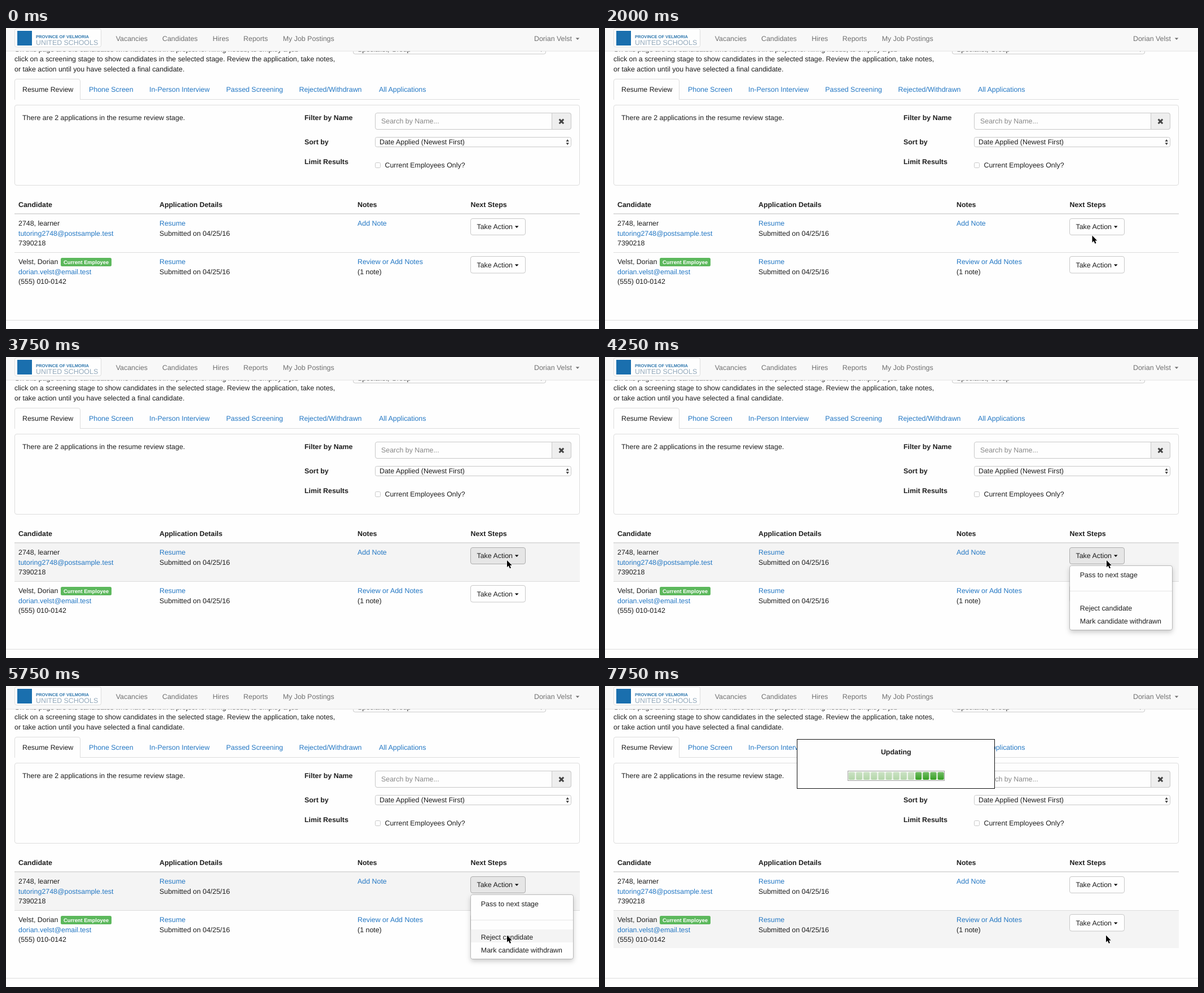
Write an HTML page that moves like this. It is 1051 by 533 pixels and loops after 8000 ms.

```html
<!DOCTYPE html>
<html lang="en">
<head>
<meta charset="utf-8">
<title>Application review</title>
<style>
  html, body { margin: 0; width: 100%; height: 100%; overflow: hidden; background: #fefefe; }
  svg { display: block; width: 1051px; height: 533px; }
  text { font: 12.42px "Liberation Sans", Arial, sans-serif; fill: #1e1e1e; text-rendering: geometricPrecision; }
  .bold text, text.bold { font-weight: bold; }
  .link text, text.link { fill: #2478c4; }
  .nav text { fill: #707070; }
  .box { fill: #fefefe; stroke: #ddd; }
  .field { fill: #fefefe; stroke: #c8c8c8; }
  .line { stroke: #ddd; fill: none; }
  .hover { fill: #f4f4f4; }
  .button.active rect { fill: #e6e6e6; stroke: #adadad; }
  #menu .panel { fill: #fefefe; stroke: rgba(0, 0, 0, .24); filter: drop-shadow(0 4px 4px rgba(0, 0, 0, .2)); }
</style>
</head>
<body>
<svg viewBox="0 0 1051 533">
  <defs>
    <path id="caret" d="M0 0h6.6l-3.3 3.5z"/>
    <path id="arrows" d="M0 4l2.7-4 2.7 4zM0 6.2l2.7 4 2.7-4z" fill="#444"/>
    <linearGradient id="shine" x2="0" y2="1">
      <stop stop-color="#fff" stop-opacity=".3"/>
      <stop offset="1" stop-color="#fff" stop-opacity="0"/>
    </linearGradient>
  </defs>

  <!-- Intro, partly scrolled under the navbar -->
  <text x="15" y="41.6">On this page are the candidates who have sent in a project for hiring needs, to employ a job</text>
  <text x="15" y="59.2">click on a screening stage to show candidates in the selected stage. Review the application, take notes,</text>
  <text x="15" y="76.8">or take action until you have selected a final candidate.</text>
  <rect class="field" x="615.5" y="28.5" width="341" height="17.5" rx="3"/>
  <text x="623" y="41.6">Specialist, Group</text>
  <use href="#arrows" x="946" y="32"/>

  <!-- Tabs -->
  <path class="line" d="M15 126.5H1017"/>
  <path class="box" d="M15.5 127V94a3.5 3.5 0 0 1 3.5-3.5H128a3.5 3.5 0 0 1 3.5 3.5V127"/>
  <text x="29" y="112.6">Resume Review</text>
  <g class="link">
    <text x="147" y="112.6">Phone Screen</text>
    <text x="254" y="112.6">In-Person Interview</text>
    <text x="390.3" y="112.6">Passed Screening</text>
    <text x="519.5" y="112.6">Rejected/Withdrawn</text>
    <text x="661" y="112.6">All Applications</text>
  </g>

  <!-- Filters -->
  <rect class="box" x="15.5" y="136.5" width="1001" height="142" rx="3.5"/>
  <text x="29" y="163">There are 2 applications in the resume review stage.</text>
  <g class="bold">
    <text x="529" y="163">Filter by Name</text>
    <text x="529" y="206">Sort by</text>
    <text x="529" y="241.2">Limit Results</text>
  </g>
  <rect class="field" x="654.5" y="150.5" width="347" height="29" rx="3.5"/>
  <path d="M967.5 150.5H998a3.5 3.5 0 0 1 3.5 3.5V176a3.5 3.5 0 0 1-3.5 3.5H967.5z" fill="#eee" stroke="#c8c8c8"/>
  <path d="M980.6 161.6l7.6 7.6m0-7.6l-7.6 7.6" stroke="#444" stroke-width="3"/>
  <text x="665" y="169.2" style="fill:#888">Search by Name...</text>
  <rect class="field" x="654.5" y="193.5" width="347" height="17" rx="3"/>
  <text x="662" y="206.2">Date Applied (Newest First)</text>
  <use href="#arrows" x="992.5" y="197"/>
  <rect class="field" x="654.5" y="238.5" width="9" height="9" rx="2"/>
  <text x="671.5" y="247.3">Current Employees Only?</text>

  <!-- Candidates -->
  <rect id="row1" class="hover" x="15" y="330" width="1002" height="67"/>
  <rect id="row2" class="hover" x="15" y="397" width="1002" height="67"/>
  <path class="line" d="M15 329H1017" stroke-width="1.8"/>
  <path class="line" d="M15 397.5H1017M0 517.5H1051"/>
  <g class="bold">
    <text x="22" y="317">Candidate</text>
    <text x="272" y="317">Application Details</text>
    <text x="623" y="317">Notes</text>
    <text x="823.5" y="317">Next Steps</text>
  </g>
  <text x="22" y="350.3">2748, learner</text>
  <text x="22" y="367.8" class="link">tutoring2748@postsample.test</text>
  <text x="22" y="385.3">7390218</text>
  <text x="272" y="350.3" class="link">Resume</text>
  <text x="272" y="367.8">Submitted on 04/25/16</text>
  <text x="623" y="350.3" class="link">Add Note</text>
  <text x="22" y="418">Velst, Dorian</text>
  <rect x="97" y="407" width="90" height="15" rx="2.5" fill="#5cb85c"/>
  <text x="102" y="418" class="bold" style="font-size:9.3px;fill:#fff">Current Employee</text>
  <text x="22" y="435.5" class="link">dorian.velst@email.test</text>
  <text x="22" y="453">(555) 010-0142</text>
  <text x="272" y="418" class="link">Resume</text>
  <text x="272" y="435.5">Submitted on 04/25/16</text>
  <text x="623" y="418" class="link">Review or Add Notes</text>
  <text x="623" y="435.5">(1 note)</text>
  <g id="action" class="button">
    <rect class="field" x="823.5" y="337.5" width="97" height="29" rx="3.5"/>
    <text x="834.5" y="356.3">Take Action</text>
    <use href="#caret" x="901.9" y="350.6"/>
  </g>
  <g class="button">
    <rect class="field" x="823.5" y="404.5" width="97" height="29.5" rx="3.5"/>
    <text x="834.5" y="424.1">Take Action</text>
    <use href="#caret" x="901.9" y="418.4"/>
  </g>

  <!-- Navbar -->
  <g class="nav">
    <rect x="-1" y="-1" width="1053" height="42" fill="#f8f8f8" stroke="#e4e4e4"/>
    <rect class="box" x="15.5" y="1.5" width="153" height="32" rx="3"/>
    <rect x="20" y="5" width="26" height="26" fill="#1a6fae"/>
    <text x="53" y="18" class="bold" style="font-size:7.55px;fill:#2c76ad">PROVINCE OF VELMORIA</text>
    <text x="53" y="30" style="font-size:12.4px;fill:#93a9bb">UNITED SCHOOLS</text>
    <text x="194.7" y="23">Vacancies</text>
    <text x="277" y="23">Candidates</text>
    <text x="366.3" y="23">Hires</text>
    <text x="420.8" y="23">Reports</text>
    <text x="490.7" y="23">My Job Postings</text>
    <text x="936" y="23">Dorian Velst</text>
    <use href="#caret" x="1009.7" y="17.5" fill="#707070"/>
  </g>

  <g id="menu">
    <rect class="panel" x="823.5" y="369.5" width="182" height="114" rx="3.5"/>
    <path class="line" d="M824 414.5H1005" stroke-opacity=".75"/>
    <rect id="passItem" class="hover" x="824" y="374" width="181" height="23"/>
    <rect id="rejectItem" class="hover" x="824" y="431" width="181" height="23"/>
    <text x="841.8" y="389.5">Pass to next stage</text>
    <text x="841.8" y="448.5">Reject candidate</text>
    <text x="841.8" y="471.5">Mark candidate withdrawn</text>
  </g>

  <g id="dialog">
    <rect x="340.5" y="94.5" width="350" height="87" fill="#fefefe" stroke="#111"/>
    <text x="515.8" y="120.6" class="bold" text-anchor="middle">Updating</text>
    <rect x="430.5" y="150.5" width="171" height="17" fill="#f1f5ef" stroke="#a5a5a5"/>
    <g id="cells"></g>
  </g>

  <path id="cursor" d="M0 0V12.2L2.8 9.6 4.9 14.3 7 13.4 5 8.9H8.7z" fill="#000" stroke="#fff" stroke-width="1.2" paint-order="stroke"/>
</svg>
<script>
const LOOP = 8000;
const $ = id => document.getElementById(id);
const show = (id, visible) => $(id).style.display = visible ? '' : 'none';

// Pointer stops: start time, x, y
const stops = [
  [1000, 792, 41], [1250, 848, 264], [1500, 851, 279], [1750, 858, 322],
  [2000, 863.5, 367.5], [2250, 868, 374], [2500, 874, 367], [2750, 877, 362],
  [3750, 888, 360], [4250, 889, 360], [5250, 888, 389], [5500, 888, 431], [5750, 888, 441.5]
];

const CELLS = 13, LIT = 4;
for (let i = 0; i < CELLS; i++) {
  const x = 431.8 + i * 13.15;
  const cell = fill => `<rect x="${x}" y="152.5" width="11" height="13.5" rx="2" fill="${fill}"/>`;
  $('cells').innerHTML += cell(i < CELLS - LIT ? '#b4d6aa' : '#36a024') + cell('url(#shine)');
}

function draw(t) {
  const during = (from, to = LOOP) => t >= from && t < to;
  const stop = stops.filter(s => s[0] <= t).pop();
  show('cursor', stop);
  if (stop) $('cursor').setAttribute('transform', `translate(${stop[1]} ${stop[2]})`);
  show('row1', during(3750, 7750));
  $('action').classList.toggle('active', during(3750, 7750));
  show('menu', during(4250, 7750));
  show('passItem', during(5250, 5500));
  show('rejectItem', during(5750, 7750));
  show('row2', during(7750));
  show('dialog', during(7750));
}

const start = performance.now();
function tick() {
  draw((performance.now() - start) % LOOP);
  requestAnimationFrame(tick);
}
tick();
</script>
</body>
</html>
```
